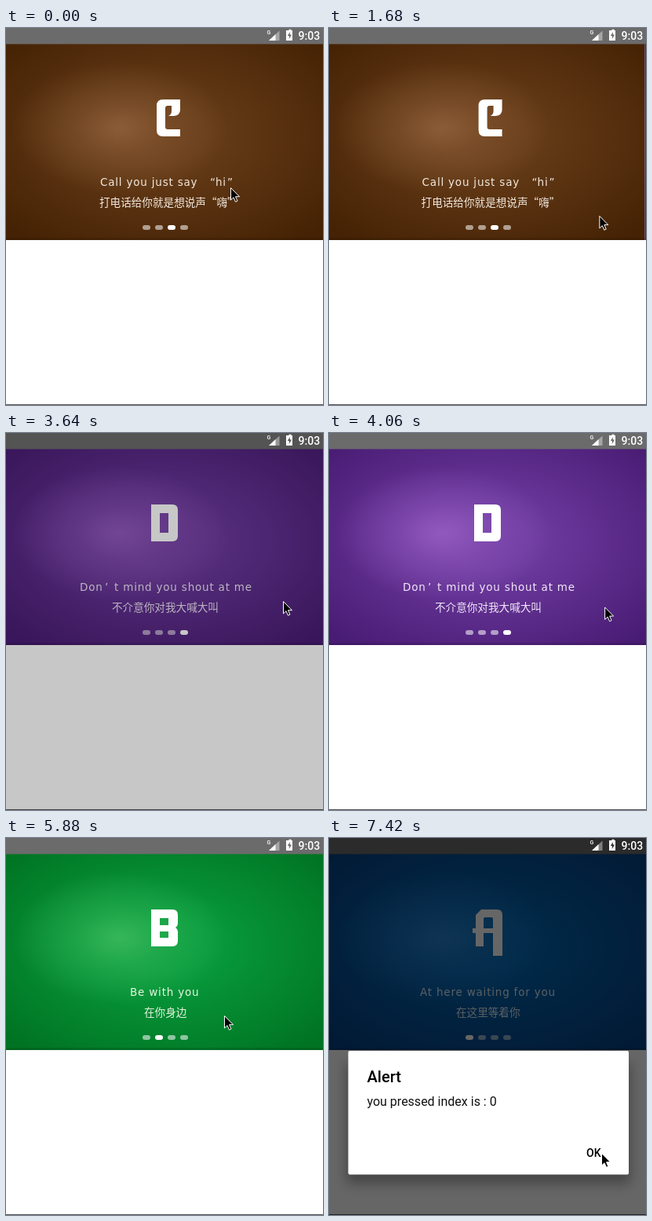
Animation, 404 px wide and 480 px high, one loop 7560 ms. Source, as an HTML page:

```html
<!DOCTYPE html>
<html lang="zh-CN">
<head>
<meta charset="utf-8">
<title>Swiper with alerts</title>
<style>
  html, body { margin: 0; width: 100%; height: 100%; overflow: hidden; background: #fff; }
  svg { display: block; width: 404px; height: 480px; }
  .ui { font-family: Roboto, sans-serif; }
  .medium { font-weight: 500; }
  .latin { font: 13.5px "DejaVu Sans", sans-serif; letter-spacing: .8px; }
  .han { font: 13.6px "Noto Sans CJK SC", "Noto Sans CJK", sans-serif; }
</style>
</head>
<body>
<svg viewBox="0 0 404 480">
  <defs>
    <clipPath id="banner"><rect y="20.500" width="404" height="249.500"/></clipPath>
    <filter id="shadow" x="-20%" y="-20%" width="140%" height="150%">
      <feGaussianBlur stdDeviation="8"/>
    </filter>
  </defs>
  <rect width="404" height="480" fill="#fff"/>
  <rect width="404" height="21" fill="#6b6b6b"/>
  <g clip-path="url(#banner)">
    <g id="slides"></g>
    <g id="dots"></g>
  </g>
  <rect y="479" width="404" height="1" fill="#555"/>
  <rect id="dim" width="404" height="480"/>
  <g id="status" fill="#fff">
    <path d="M348.500 3.500V16H335Z" opacity=".4"/>
    <path d="M343.500 8V16H335Z"/>
    <path fill-rule="evenodd" d="M359 3h1.500V1.800h3V3h1.500v13h-8V3ZM361.800 5l-3 5h2v4l3.200-5.500h-2.200Z"/>
    <text class="ui medium" x="332.500" y="8" font-size="7">G</text>
    <text class="ui medium" x="372.500" y="14.500" font-size="14">9:03</text>
  </g>
  <g id="dialog" class="ui">
    <rect x="22" y="286" width="362" height="154" rx="4" opacity=".32" filter="url(#shadow)"/>
    <rect x="24.500" y="271" width="357.500" height="157.500" rx="2" fill="#fff"/>
    <text class="medium" x="48.500" y="310.500" font-size="20">Alert</text>
    <text id="message" x="48.500" y="341" font-size="16" fill="#111"></text>
    <text class="medium" x="328" y="405.500" font-size="14">OK</text>
  </g>
  <path id="cursor" d="M.5 1.500V17L4 13.700L6.500 19.300L8.900 18.200L6.500 12.700H11.500Z"
        stroke="#fff" stroke-linejoin="round"/>
</svg>
<script>
const LOOP = 7560, FRAME = 140, WIDTH = 404;
const $ = id => document.getElementById(id);
const clamp = v => Math.max(0, Math.min(1, v));
const smooth = v => { v = clamp(v); return v * v * (3 - 2 * v); };

// Each line holds [x, text] runs.
const slides = [
  {
    glow: '#2682d2', mid: '#0067b4', edge: '#064184', ink: '#e3f1f9',
    letter: 'M187 115V98L194 91H214Q221 91 221 98V150H209V121H197V138H187V121H183V115ZM197 115H209V103Q209 101 207 101H199Q197 101 197 103Z',
    latin: [[116, 'At here waiting for you']],
    han: [[162, '在这里等着你']]
  },
  {
    glow: '#35b659', mid: '#089b3d', edge: '#007322', ink: '#e4f6df',
    letter: 'M185 91H212Q219 91 219 98V109Q219 112 216 114Q219 116 219 119V131Q219 138 212 138H185ZM196 102V111H207V102ZM196 119V127H207V119Z',
    latin: [[158, 'Be with you']],
    han: [[176, '在你身边']]
  },
  {
    glow: '#8b5c37', mid: '#663c18', edge: '#452204', ink: '#f3e9de',
    letter: 'M200 91H222V104Q222 111 214 112H207Q211 110 211 106V99H206Q203 99 203 102V126Q203 129 206 129H222V138H200Q192 138 192 130V99Q192 91 200 91Z',
    latin: [[120, 'Call you just say'], [260, '“'], [267, 'hi'], [282, '”']],
    han: [[119, '打电话给你就是想说声“嗨”']]
  },
  {
    glow: '#9259bd', mid: '#6e3ba0', edge: '#491c74', ink: '#f1e7f7',
    letter: 'M185 91H212Q219 91 219 98V131Q219 138 212 138H185ZM196 102V127H207V102Z',
    latin: [[94, 'Don'], [126, '’'], [138, 't mind you shout at me']],
    han: [[135, '不介意你对我大喊大叫']]
  }
];

const runs = (line, y, style, ink) => line
  .map(([x, text]) => `<text class="${style}" x="${x}" y="${y}" fill="${ink}">${text}</text>`).join('');

// Gradients use bounding-box units, so they follow the banner's wide ellipse.
$('slides').innerHTML = slides.map((s, i) => `
  <g>
    <radialGradient id="base${i}" cx=".5" cy=".47" r=".68">
      <stop offset=".2" stop-color="${s.mid}"/><stop offset="1" stop-color="${s.edge}"/>
    </radialGradient>
    <radialGradient id="glow${i}" cx=".36" cy=".43" r=".34">
      <stop offset="0" stop-color="${s.glow}"/>
      <stop offset=".4" stop-color="${s.glow}" stop-opacity=".5"/>
      <stop offset="1" stop-color="${s.glow}" stop-opacity="0"/>
    </radialGradient>
    <rect y="20" width="404" height="250" fill="url(#base${i})"/>
    <rect y="20" width="404" height="250" fill="url(#glow${i})"/>
    <rect y="267" width="404" height="3" opacity=".12"/>
    <path d="${s.letter}" fill="#fff" fill-rule="evenodd"/>
    ${runs(s.latin, 201, 'latin', s.ink)}
    ${runs(s.han, 226.5, 'han', s.ink)}
  </g>`).join('');
$('dots').innerHTML = slides
  .map((s, i) => `<rect x="${174 + i * 16}" y="251" width="10" height="6" rx="3" fill="#fff"/>`).join('');

// start, end, from page, to page
const swipes = [[1830, 2250, 2, 3], [4350, 4800, 3, 4], [5380, 5800, 4, 5], [6330, 6750, 5, 4]];
// index, opening time, closing time
const alerts = [[2, 480, 1290], [3, 2780, 3513], [0, 7040, Infinity]];
// time, x, y
const pointer = [
  [0, 286, 202], [420, 286, 202], [800, 326, 435], [980, 326, 435], [1210, 340, 401], [1350, 340, 401],
  [1780, 345, 212], [2060, 235, 212], [2340, 300, 208], [2780, 300, 208], [3400, 353, 213], [3700, 353, 213],
  [4320, 350, 225], [4560, 235, 232], [4880, 299, 229], [5360, 350, 254], [5580, 230, 240], [5860, 278, 225],
  [5920, 278, 225], [6310, 195, 225], [6530, 310, 228], [6980, 300, 225], [7380, 347, 400], [LOOP, 347, 400]
];

function pageAt(t) {
  let page = t > 420 ? 2.0035 : 2, settled = 2;
  for (const [start, end, from, to] of swipes) {
    if (t >= start) page = from + (to - from) * smooth((t - start) / (end - start));
    if (t >= end) settled = to;
  }
  return { page, active: settled % 4 };
}

function pointerAt(t) {
  const i = pointer.findIndex(p => p[0] > t);
  const [t0, x0, y0] = pointer[i - 1], [t1, x1, y1] = pointer[i];
  const k = smooth((t - t0) / (t1 - t0));
  return [x0 + (x1 - x0) * k, y0 + (y1 - y0) * k];
}

function render(t) {
  const { page, active } = pageAt(t);
  [...$('slides').children].forEach((slide, i) => {
    const offset = ((i - page + 2) % 4 + 4) % 4 - 2;
    slide.setAttribute('transform', `translate(${offset * WIDTH} 0)`);
  });
  [...$('dots').children].forEach((dot, i) => dot.setAttribute('opacity', i === active ? 1 : .55));

  const [index, opened, closed] = alerts.filter(a => t >= a[1]).pop() || [0, Infinity, Infinity];
  const fade = (inMs, outMs) => clamp((t - opened) / inMs) * (1 - clamp((t - closed) / outMs));
  $('dim').setAttribute('opacity', .6 * fade(200, 200));
  $('dialog').setAttribute('opacity', fade(150, 100));
  $('message').textContent = `you pressed index is : ${index}`;
  $('cursor').setAttribute('transform', `translate(${pointerAt(t).join(' ')})`);
}

const began = performance.now();
function tick() {
  const t = (performance.now() - began) % LOOP;
  render(Math.floor(t / FRAME) * FRAME);
  requestAnimationFrame(tick);
}
tick();
</script>
</body>
</html>
```
